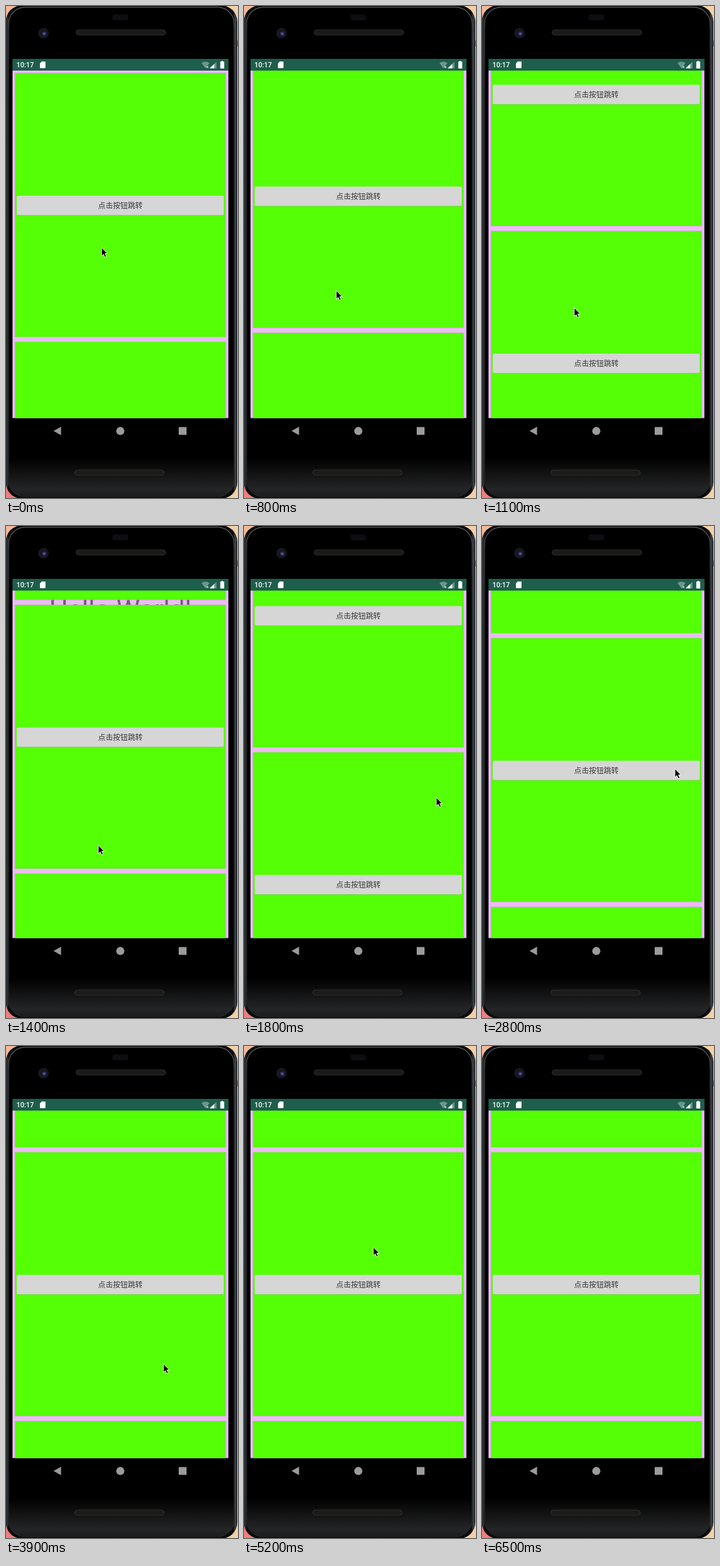
Recreate the animation shown at these times as an HTML page. Size 356 by 754 pixels, loop 7.7 s.

```html
<!DOCTYPE html>
<html lang="zh">
<head>
<meta charset="utf-8">
<title>Scrolling cards</title>
<style>
html, body { margin: 0; width: 100%; height: 100%; overflow: hidden; background: #000; }
svg { display: block; width: 100vw; height: 100vh; }
text { font-family: Roboto, "Noto Sans CJK SC", "Noto Sans CJK", sans-serif; }
</style>
</head>
<body>
<svg viewBox="0 0 356 754" preserveAspectRatio="none">
  <defs>
    <linearGradient id="wall" x2="1" y2="0">
      <stop offset="0" stop-color="#f3b795"/>
      <stop offset="1" stop-color="#f3cfa6"/>
    </linearGradient>
    <linearGradient id="rim" x2="1" y2="0">
      <stop offset="0" stop-color="#15171a"/>
      <stop offset=".006" stop-color="#35383b"/>
      <stop offset=".014" stop-color="#08090a"/>
      <stop offset=".982" stop-color="#08090a"/>
      <stop offset=".992" stop-color="#42464a"/>
      <stop offset="1" stop-color="#17191b"/>
    </linearGradient>
    <linearGradient id="edge" x2="0" y2="1">
      <stop offset="0" stop-color="#6e7072"/>
      <stop offset=".05" stop-color="#3a3d40"/>
      <stop offset=".2" stop-color="#25282a"/>
      <stop offset="1" stop-color="#25282a"/>
    </linearGradient>
    <linearGradient id="glass" x2="0" y2="1">
      <stop offset="0" stop-color="#000"/>
      <stop offset=".92" stop-color="#000"/>
      <stop offset=".985" stop-color="#242526"/>
      <stop offset="1" stop-color="#1a1b1c"/>
    </linearGradient>
    <radialGradient id="lens" cx=".56" cy=".54">
      <stop offset="0" stop-color="#7a78bc"/>
      <stop offset=".3" stop-color="#2a2858"/>
      <stop offset=".6" stop-color="#11111c"/>
      <stop offset="1" stop-color="#1d1d22"/>
    </radialGradient>
    <pattern id="mesh" width="2" height="2" patternUnits="userSpaceOnUse">
      <rect width="2" height="2" fill="#151514"/>
      <rect width="1" height="1" fill="#2c2b2a"/>
    </pattern>
    <clipPath id="view"><rect x="10" y="99" width="331.5" height="532.5"/></clipPath>
    <g id="card">
      <rect x="13.5" y="-.5" width="324" height="405" rx="1" fill="none" stroke="#98a58c" stroke-opacity=".3"/>
      <rect x="14" width="323" height="404" fill="#55ff06"/>
      <rect x="16.5" y="188.3" width="317.5" height="30" rx="1.5" fill="#7d9c6a" opacity=".5"/>
      <rect x="16.5" y="187.8" width="317.5" height="29.6" rx="1.5" fill="#d6d6d6"/>
      <text x="175.5" y="206.8" font-size="11.4" text-anchor="middle" fill="#363636">点击按钮跳转</text>
    </g>
  </defs>

  <rect width="356" height="754" fill="url(#wall)"/>
  <rect y="715" width="30" height="39" fill="#ee7f7c"/>
  <rect x="352.5" y="53" width="3.5" height="9" fill="#8b8886"/>
  <rect x="-.5" y="-1" width="355.5" height="756" rx="25" fill="url(#rim)"/>
  <rect x="4" y="2" width="346" height="750" rx="25" fill="url(#glass)" stroke="url(#edge)" stroke-width="1.200"/>

  <rect x="163.5" y="13" width="24" height="9" rx="3" fill="#0d0d12"/>
  <circle cx="57.7" cy="41.8" r="8" fill="url(#lens)"/>
  <g fill="url(#mesh)" stroke="#353433" stroke-width=".8">
    <rect x="107.5" y="36.5" width="137.5" height="8" rx="4"/>
    <rect x="105.5" y="711" width="137" height="8" rx="4"/>
  </g>

  <rect x="10" y="81" width="331.5" height="18" fill="#1e5e4d"/>
  <text x="16" y="94.3" font-size="10.500" font-weight="500" fill="#fff">10:17</text>
  <path d="M55 85h4.600q1 0 1 1v8.300q0 1-1 1h-6.600q-1 0-1-1V88z" fill="#fff"/>
  <path d="M300 87.500q6-4.500 12.200 0L306 95.500z" fill="#fff" opacity=".35"/>
  <path d="M307.500 92l3 3m0-3l-3 3" stroke="#fff" stroke-width="1"/>
  <path d="M323 85.500V95.500H312.500z" fill="#fff" opacity=".35"/>
  <path d="M319.500 88.800V95.500H312.500z" fill="#fff"/>
  <path d="M330.500 85.300v-1.100h2.600v1.100h1.700v10.500h-6v-10.500z" fill="#fff"/>

  <g clip-path="url(#view)">
    <rect x="10" y="99" width="331.5" height="533" fill="#edbbf6"/>
    <text x="175.5" y="141.500" font-size="40.5" text-anchor="middle" fill="#725b78">Hello World!</text>
    <g id="list"></g>
  </g>

  <g fill="#9b9b9b">
    <path d="M73 651.300L84.500 644.800V657.800z"/>
    <circle cx="175.400" cy="651.300" r="6.200"/>
    <rect x="265" y="645.300" width="12" height="12" rx=".8"/>
  </g>

  <path id="cursor" d="M0 0V13.200L3 10.500L5.200 15L7.500 14L5.400 9.500H9.300z" fill="#000" stroke="#fff" stroke-width=".9" stroke-linejoin="round"/>
</svg>
<script>
const LOOP = 7700, STEP = 100, PITCH = 412, TOP = 103;
const list = document.getElementById("list");
const cursor = document.getElementById("cursor");

// [time, scroll offset]
const scrollKeys = [[0, 0], [500, 0], [800, 14], [1400, 394], [1800, 580], [2400, 733], [3200, 764]];
// [time, x, y]
const cursorKeys = [
  [0, 146.5, 370], [800, 141.5, 436], [1400, 141.5, 489], [1600, 200, 460], [1800, 295, 416],
  [2400, 297, 414], [3200, 295, 330], [3500, 146, 489], [3600, 146, 489], [3900, 241.5, 487],
  [4200, 241.5, 487], [4700, 215, 400], [4800, 215, 400], [5400, 190, 262], [6300, 190, 262], [6400, 163, 219]
];
const HIDE = 6500;

const cards = [0, 1, 2, 3].map(() => {
  const use = document.createElementNS("http://www.w3.org/2000/svg", "use");
  use.setAttribute("href", "#card");
  return list.appendChild(use);
});

function segment(keys, t) {
  let i = 0;
  while (i < keys.length - 2 && t >= keys[i + 1][0]) i++;
  const a = keys[i], b = keys[i + 1];
  return { i, a, b, u: Math.min(1, (t - a[0]) / (b[0] - a[0])) };
}

// Monotone cubic slope: harmonic mean of the neighbouring secants.
function slope(keys, i) {
  if (i === 0 || i === keys.length - 1) return 0;
  const rate = j => (keys[j + 1][1] - keys[j][1]) / (keys[j + 1][0] - keys[j][0]);
  const p = rate(i - 1), q = rate(i);
  return p * q > 0 ? 2 * p * q / (p + q) : 0;
}

function scrollAt(t) {
  const { i, a, b, u } = segment(scrollKeys, t);
  const span = b[0] - a[0], v = 1 - u;
  return a[1] * (1 + 2 * u) * v * v + b[1] * u * u * (3 - 2 * u)
    + span * (slope(scrollKeys, i) * u * v * v - slope(scrollKeys, i + 1) * u * u * v);
}

function place(node, x, y) {
  node.setAttribute("transform", `translate(${x.toFixed(2)} ${y.toFixed(2)})`);
}

function draw(time) {
  const t = Math.floor(time % LOOP / STEP) * STEP;
  const offset = Math.round(scrollAt(t));
  cards.forEach((card, i) => place(card, 0, TOP + i * PITCH - offset));
  const { a, b, u } = segment(cursorKeys, t);
  place(cursor, a[1] + (b[1] - a[1]) * u, a[2] + (b[2] - a[2]) * u);
  cursor.setAttribute("visibility", t < HIDE ? "visible" : "hidden");
}

const start = performance.now();
function tick() {
  draw(performance.now() - start);
  requestAnimationFrame(tick);
}
tick();
</script>
</body>
</html>
```
